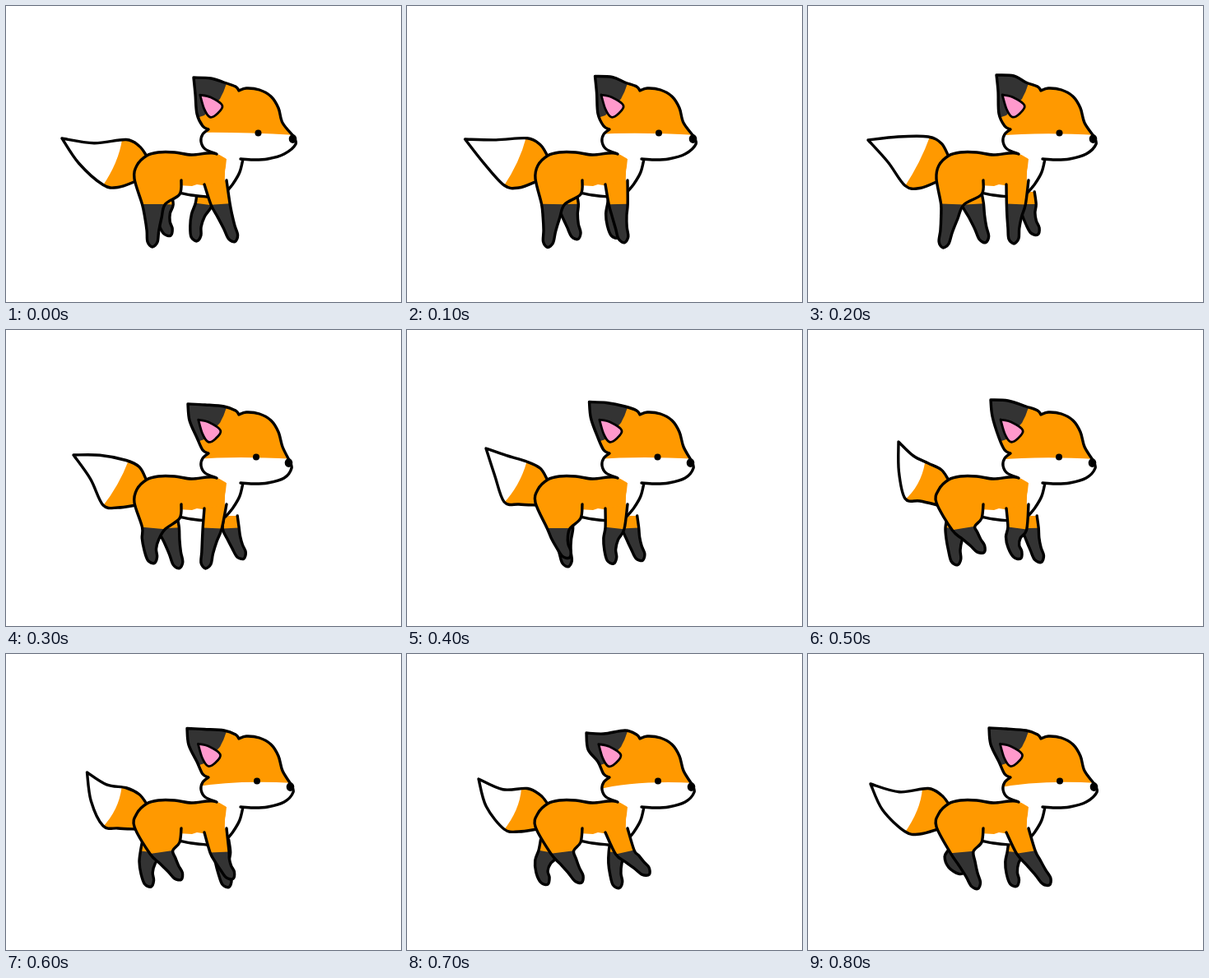
These frames come from a looping animation (480 px wide and 360 px high, 0.9 s). An HTML page with a canvas:

```html
<!DOCTYPE html>
<html lang="en">
<head>
<meta charset="utf-8">
<title>Walking fox</title>
<style>
  html, body { margin: 0; width: 100%; height: 100%; overflow: hidden; background: #fff; }
  canvas { display: block; }
</style>
</head>
<body>
<canvas id="stage" width="480" height="360"></canvas>
<script>
const ORANGE = '#ff9900', DARK = '#333333', PINK = '#ff99cc', WHITE = '#ffffff', INK = '#000000';
const STEP = 100, STEPS = 9, HOCK_Y = 241, PAW = 6;
const ctx = document.getElementById('stage').getContext('2d');

const points = text => text.split(' ').map(pair => pair.split(',').map(Number));
const mix = (a, b, t) => a + (b - a) * t;
const mixAll = (a, b, t) => a.map((v, i) => mix(v, b[i], t));

// Key positions over the walk; the steps between them are interpolated
const keySteps = [0, 2, 3, 5, 7, 8];
const tracks = {
  tailTip: points('68,161 73,163 82,152 110,136 87,152 76,158'),
  tailSag: points('5 -2 -3 4 7 7'),
  earTip: points('228,87 229,84 221,90 222,85 218,96 220,90'),
  face: points('349,153 347,157 344,156 346,157 346,164 348,162'), // nose x, cheek y
  hind: points('178,287 165,288 178,278 210,266 209,273 204,280'),
  farHind: points('197,274 214,282 209,284 180,280 168,275 186,262'),
  front: points('276,281 250,283 243,284 255,273 290,264 290,276'),
  farFront: points('231,280 276,273 286,273 281,277 256,279 251,277')
};

function poseAt(step) {
  const next = Math.max(1, keySteps.findIndex(key => key >= step));
  const t = (step - keySteps[next - 1]) / (keySteps[next] - keySteps[next - 1]);
  return Object.fromEntries(Object.entries(tracks).map(
    ([name, keys]) => [name, mixAll(keys[next - 1], keys[next], t)]));
}

const back = points('256,179 244,179 225,181 205,178 185,178 171,182 159,194 156,210');
const torso = points('171,182 256,179 268,186 266,204 268,228 243,232 212,228 180,230');
const chest = points('252,178 268,186 266,204 267,228 276,216 284,202 288,185');
const chestLine = points('288,186 284,202 276,216 267,227');
const belly = points('208,218 226,219 232,217 245,219 245,232 225,229 208,227');
const bellyLine = points('210,227 225,230 244,232');
const cheek = points('256,180 242,174 237,165 239,156 246,150 246,150');
const skull = points('283,103 283,103 292,100 308,102 322,110 331,124 336,142');
const jaw = points('338,180 318,186 300,187 285,186');
const innerEar = points('234,109 247,112 261,122 255,132 246,136 239,126 234,109');

// Catmull-Rom curve; a repeated point makes a sharp corner
function curve(pts) {
  const path = new Path2D();
  const at = i => pts[Math.max(0, Math.min(pts.length - 1, i))];
  path.moveTo(...pts[0]);
  for (let i = 0; i < pts.length - 1; i++) {
    const [a, b, c, d] = [at(i - 1), at(i), at(i + 1), at(i + 2)];
    if (b[0] === c[0] && b[1] === c[1]) continue;
    path.bezierCurveTo(b[0] + (c[0] - a[0]) / 6, b[1] + (c[1] - a[1]) / 6,
      c[0] - (d[0] - b[0]) / 6, c[1] - (d[1] - b[1]) / 6, ...c);
  }
  return path;
}

function polygon(pts) {
  const path = new Path2D();
  pts.forEach(p => path.lineTo(...p));
  path.closePath();
  return path;
}

function fill(path, color) {
  ctx.fillStyle = color;
  ctx.fill(path);
}

function outline(path, width = 3.4) {
  ctx.lineWidth = width;
  ctx.stroke(path);
}

function dot(x, y, rx, ry = rx) {
  ctx.fillStyle = INK;
  ctx.beginPath();
  ctx.ellipse(x, y, rx, ry, 0, 0, Math.PI * 2);
  ctx.fill();
}

// Fill a shape, paint markings inside it, then ink its edge
function painted(shape, base, markings) {
  fill(shape, base);
  ctx.save();
  ctx.clip(shape);
  for (const [path, color] of markings) fill(path, color);
  ctx.restore();
  outline(shape);
}

// Tapering outline from hock to paw; a raised paw that trails bends backwards
function shank(hockX, [pawX, pawY], half) {
  const ahead = pawX - hockX;
  const bend = Math.max(0, 285 - pawY) * Math.max(0, 1 - ahead / 16);
  const kneeX = (hockX + pawX) / 2 - bend, kneeY = (HOCK_Y + pawY) / 2;
  const left = [], right = [];
  for (const t of [0, 0.35, 0.7, 1]) {
    const x = mix(mix(hockX, kneeX, t), mix(kneeX, pawX, t), t), y = mix(HOCK_Y, pawY, t);
    const dx = mix(kneeX - hockX, pawX - kneeX, t) * mix(0.2, 1, t), dy = pawY - kneeY;
    const width = mix(PAW, half, (1 - t) ** 1.5) / Math.hypot(dx, dy);
    left.push([x - dy * width, y + dx * width]);
    right.unshift([x + dy * width, y - dx * width]);
  }
  const dx = pawX - kneeX, dy = pawY - kneeY, reach = PAW / Math.hypot(dx, dy);
  return [...left, [pawX + dx * reach, pawY + dy * reach], ...right];
}

function leg(home, paw, swing, half, before, after) {
  const hockX = mix(home, paw[0], swing);
  const lower = shank(hockX, paw, half);
  const start = before || [[hockX - half * 0.8, 226]];
  const end = after || [[hockX + half * 0.8, 226]];
  painted(curve([...start, ...lower, ...end]), ORANGE, [[curve(lower), DARK]]);
}

function tail({ tailTip: [x, y], tailSag: [sag] }) {
  const topY = 160 + sag / 2, lowY = 214 + (y - 154) / 2;
  const shape = curve([
    [170, 181], [162, topY + 8], [146, topY],
    [(x + 146) / 2, (y + topY) / 2 + sag], [x, y], [x, y],
    [(x + 118) / 2 - sag * 0.9, (y + lowY) / 2 + sag * 0.4],
    [118, lowY], [136, lowY + 3], [158, 213]
  ]);
  const tip = new Path2D(`M0 0H${146 - sag}V${topY}Q137 190 117 ${lowY + 2}V260H0Z`);
  painted(shape, ORANGE, [[tip, WHITE]]);
}

function body({ hind, front }) {
  fill(polygon(torso), ORANGE);
  fill(polygon(belly), WHITE);
  outline(curve(bellyLine));
  fill(curve(chest), WHITE);
  outline(curve(chestLine));
  leg(180, hind, 0.3, 14, back, points('211,229 213,212'));
  leg(254, front, 0.3, 11.5, points('241,217'), points('268,212'));
}

function head({ earTip: [x, y], face: [noseX, cheekY] }) {
  const ear = [[239, 146], [232, 131], [x + 2, y + 20], [x, y], [x, y], [x + 21, y + 1], [265, 93], [279, 98]];
  const nose = [[noseX, 158], [noseX, 158], [noseX + 3, 168]];
  const mask = new Path2D(`M200 70H352V157Q280 153 230 ${cheekY + 1}Z`);
  const earTip = new Path2D('M205 75H271L268 94Q265 104 260 113L241 133L229 137H205Z');
  painted(curve([...cheek, ...ear, ...skull, ...nose, ...jaw]), WHITE, [[mask, ORANGE], [earTip, DARK]]);

  const shift = (x - 222) * 0.3;
  const inner = curve(innerEar.map(([px, py]) => [px + shift, py - shift / 2]));
  fill(inner, PINK);
  outline(inner, 2.8);
  dot(305 + (noseX - 346) / 2, 154.5, 4);
  dot(noseX - 0.5, 161.5, 4.8, 5.4);
}

function draw(pose) {
  ctx.fillStyle = WHITE;
  ctx.fillRect(0, 0, 480, 360);
  ctx.strokeStyle = INK;
  ctx.lineCap = ctx.lineJoin = 'round';
  tail(pose);
  leg(180, pose.farHind, 0.6, 13);
  leg(254, pose.farFront, 0.6, 10);
  body(pose);
  head(pose);
}

function tick() {
  draw(poseAt(Math.floor(performance.now() / STEP) % STEPS));
  requestAnimationFrame(tick);
}
tick();
</script>
</body>
</html>
```
